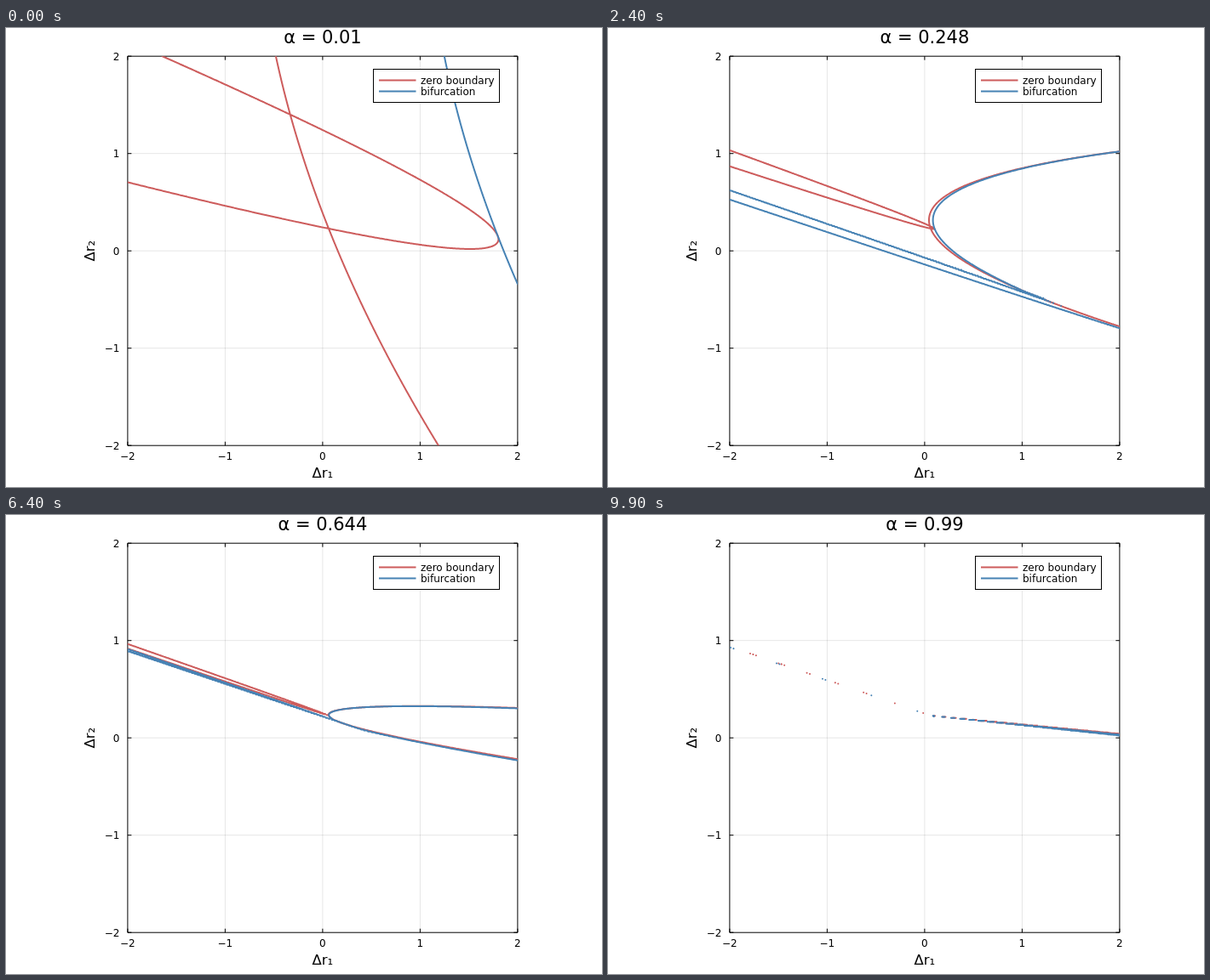
Recreate the animation shown at these times as an HTML page. Size 700 px wide and 540 px high, loop 10000 ms.

```html
<!DOCTYPE html>
<html lang="en">
<head>
<meta charset="utf-8">
<title>Bifurcation diagram</title>
<style>
  html, body { margin: 0; width: 100%; height: 100%; overflow: hidden; background: #fff; }
  svg { display: block; width: 700px; height: 540px; }
  text { font-family: "DejaVu Sans", sans-serif; font-size: 12px; }
  .mid { text-anchor: middle; }
  .end { text-anchor: end; }
  .label { font-size: 16.5px; }
  .title { font-size: 21px; }
  .curve { fill: none; stroke-width: 2; stroke-linecap: round; }
  .red { stroke: #cd5c5c; }
  .blue { stroke: #4682b4; }
  .grid { fill: none; stroke: #000; stroke-opacity: .1; }
  .axis { fill: none; stroke: #000; }
</style>
</head>
<body>
<svg viewBox="0 0 700 540">
  <clipPath id="plot"><rect x="142.9" y="33.2" width="458" height="458"/></clipPath>
  <path class="grid" id="grid"/>
  <path class="axis" id="axis"/>
  <g clip-path="url(#plot)">
    <path class="curve red" id="zero"/>
    <path class="curve blue" id="fold"/>
  </g>
  <g id="ticks"></g>
  <text class="mid title" id="title" x="371.9" y="18"></text>
  <text class="mid label" x="371.9" y="529">Δr₁</text>
  <text class="mid label" transform="translate(103.5 262.2) rotate(-90)">Δr₂</text>
  <rect x="431.5" y="48.5" width="148" height="39" fill="#fff" stroke="#000"/>
  <path class="curve red" style="stroke-linecap:butt" d="M438 61.5H481.5"/>
  <path class="curve blue" style="stroke-linecap:butt" d="M438 74.5H481.5"/>
  <text x="487" y="66">zero boundary</text>
  <text x="487" y="79">bifurcation</text>
</svg>
<script>
const $ = id => document.getElementById(id);
const SCALE = 114.5, CX = 371.9, CY = 262.2;
const px = x => CX + SCALE * x;
const py = y => CY - SCALE * y;

// Equilibria (s, t), centred on (X0, Y0) and scaled by w = (1 - α)² / α:
//   x             = ax s + bx t - s² + t²
//   v = y + kc x  = av s + bv t + d t² + e s t
// Zero boundaries are s = 0 and t = 0; folds are double roots of the system.
const X0 = .062, Y0 = .229;
const ax = .2666, av = .0376, bx = -.1754, bu = .4253;
const kc = .3448, kd = .099, e = .0655;
const d = kc - kd, bv = bu + d * bx;

function boundaryS(x, y) {
  const v = (y + kc * x) / av;
  return x - ax * v + v * v;
}

function boundaryT(x, y) {
  const u = (y + kd * x) / bu;
  return x - bx * u - u * u;
}

// Discriminant of the quartic in t left after eliminating s.
const q3 = -2 * bv * d - ax * d * e + 2 * av * e + bx * e * e;
const q4 = e * e - d * d;
function discriminant(x, y) {
  const v = y + kc * x;
  const q0 = -v * v + ax * v * av - x * av * av;
  const q1 = 2 * v * bv + ax * (v * e - bv * av) + bx * av * av - 2 * x * av * e;
  const q2 = 2 * v * d - bv * bv - ax * (bv * e + d * av) + av * av + 2 * bx * av * e - x * e * e;
  const i = 12 * q4 * q0 - 3 * q3 * q1 + q2 * q2;
  const j = 72 * q4 * q2 * q0 + 9 * q3 * q2 * q1 - 27 * q4 * q1 * q1
    - 27 * q0 * q3 * q3 - 2 * q2 * q2 * q2;
  return 4 * i * i * i - j * j;
}

// Zero contour on a regular grid (marching squares).
const N = 400, STEP = 4 / (N - 1);
const field = new Float64Array(N * N);
function contour(fn, w) {
  for (let r = 0, k = 0; r < N; r++) {
    const y = (-2 + r * STEP - Y0) / w;
    for (let c = 0; c < N; c++) field[k++] = fn((-2 + c * STEP - X0) / w, y);
  }
  const point = (c, r) => px(-2 + c * STEP).toFixed(2) + " " + py(-2 + r * STEP).toFixed(2);
  let path = "";
  for (let r = 0; r < N - 1; r++) {
    for (let c = 0; c < N - 1; c++) {
      const k = r * N + c;
      const f00 = field[k], f10 = field[k + 1], f01 = field[k + N], f11 = field[k + N + 1];
      const s00 = f00 > 0, s10 = f10 > 0, s01 = f01 > 0, s11 = f11 > 0;
      if (s00 === s10 && s00 === s01 && s00 === s11) continue;
      const hits = [];
      if (s00 !== s10) hits.push(point(c + f00 / (f00 - f10), r));
      if (s10 !== s11) hits.push(point(c + 1, r + f10 / (f10 - f11)));
      if (s01 !== s11) hits.push(point(c + f01 / (f01 - f11), r + 1));
      if (s00 !== s01) hits.push(point(c, r + f00 / (f00 - f01)));
      for (let h = 0; h < hits.length; h += 2) path += "M" + hits[h] + "L" + hits[h + 1];
    }
  }
  return path;
}

function drawAxes() {
  const [l, r, t, b] = [px(-2), px(2), py(2), py(-2)];
  const len = 4.5;
  let grid = "", axis = `M${l} ${t}H${r}V${b}H${l}Z`, labels = "";
  for (let n = -2; n <= 2; n++) {
    const x = px(n), y = py(n), name = String(n).replace("-", "−");
    if (Math.abs(n) < 2) grid += `M${x} ${t}V${b}M${l} ${y}H${r}`;
    axis += `M${x} ${b}v${-len}M${x} ${t}v${len}M${l} ${y}h${len}M${r} ${y}h${-len}`;
    labels += `<text class="mid" x="${x}" y="507.5">${name}</text>`
      + `<text class="end" x="133.5" y="${y + 4.4}">${name}</text>`;
  }
  $("grid").setAttribute("d", grid);
  $("axis").setAttribute("d", axis);
  $("ticks").innerHTML = labels;
}

const STEPS = 100, STEP_MS = 100;
function draw(step) {
  const alpha = .01 + .98 * step / (STEPS - 1);
  const w = (1 - alpha) ** 2 / alpha;
  $("title").textContent = "α = " + Number(alpha.toFixed(3));
  $("zero").setAttribute("d", contour(boundaryS, w) + contour(boundaryT, w));
  $("fold").setAttribute("d", contour(discriminant, w));
}

drawAxes();
draw(0);
let shown = 0;
const start = performance.now();
function tick() {
  const step = Math.floor((performance.now() - start) / STEP_MS) % STEPS;
  if (step !== shown) draw(shown = step);
  requestAnimationFrame(tick);
}
requestAnimationFrame(tick);
</script>
</body>
</html>
```
